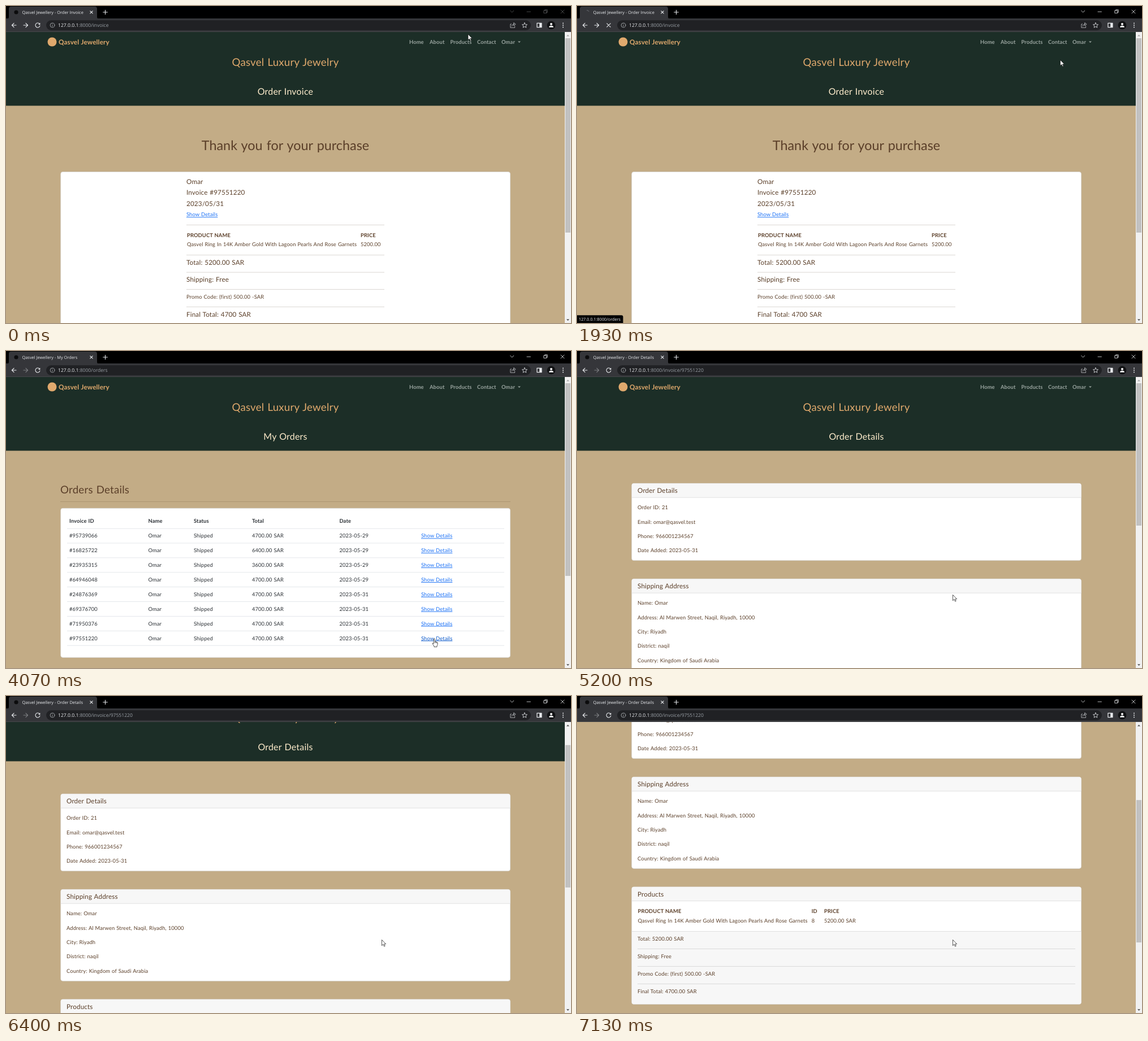
An HTML page that plays this animation: 999 px wide and 561 px high, repeating every 7.54 s.

```html
<!DOCTYPE html>
<html lang="en">
<head>
<meta charset="utf-8">
<title>Order pages</title>
<style>
html, body { margin: 0; width: 100%; height: 100%; overflow: hidden; background: #c3ac86; }
svg { display: block; width: 999px; height: 561px; text-rendering: geometricPrecision; }
.page text { font-family: Lato, "Open Sans", sans-serif; letter-spacing: .012em; word-spacing: .05em; }
.page text.title { letter-spacing: 0; }
.ui text { font-family: "Open Sans", "Noto Sans", sans-serif; }
.line { fill: none; stroke: #e8eaed; stroke-width: 1.1; stroke-linecap: round; stroke-linejoin: round; }
.link { fill: #1a70f5; text-decoration: underline; text-decoration-thickness: .7px; }
.link.on { fill: #0a58ca; }
.nav { fill: #9aa5a0; }
.nav.on { fill: #c4cbc8; }
</style>
</head>
<body>
<svg id="stage" viewBox="0 0 999 561" xmlns="http://www.w3.org/2000/svg"></svg>
<script>
const BRAND = 'Qasvel', USER = 'Omar';
const ITEM = BRAND + ' Ring In 14K Amber Gold With Lagoon Pearls And Rose Garnets';
const BROWN = '#5b3f29', INK = '#2b3035', BODY = 9.37, HEAD = 11.7;
const LOOP = 7540, TICK = 1000 / 15;

// c is the vertical middle of the capitals
const text = (x, c, size, str, fill = BROWN, attrs = '') =>
  `<text x="${x}" y="${(c + size * .36).toFixed(2)}" font-size="${size}" fill="${fill}" ${attrs}>${str}</text>`;
const rect = (x, y, w, h, fill, attrs = '') =>
  `<rect x="${x}" y="${y}" width="${w}" height="${h}" fill="${fill}" ${attrs}/>`;
const rule = (x1, x2, y, colour) => rect(x1, y - .4, x2 - x1, .8, colour);
const path = (d, attrs = 'class="line"') => `<path d="${d}" ${attrs}/>`;
const BOLD = 'font-weight="700"', MID = 'text-anchor="middle"';
const card = (y, h) => rect(96.7, y + .3, 794.9, h - .6, '#fff', 'rx="3.8" stroke="#d2d2d2" stroke-width=".65"');
const link = (x, c, id) =>
  `<text x="${x}" y="${c + 3.37}" font-size="${BODY}" class="link" id="${id}">Show Details</text>`;

const NAV = [['Home', 713, 739], ['About', 749, 776], ['Products', 785.5, 823],
  ['Contact', 833, 866], [USER, 876, 911]];

function header(title) {
  const links = NAV.map(([name, x], i) =>
    `<text x="${x}" y="67.4" font-size="${BODY}" font-weight="700" class="nav n${i}">${name}</text>`).join('');
  return rect(0, 46, 988, 130.5, '#1c2e27') +
    '<circle cx="81.5" cy="63.5" r="8" fill="#e0a96d"/>' +
    text(93, 64, HEAD, BRAND + ' Jewellery', '#e0a96d', BOLD) + links +
    path('M905 62.5h5l-2.5 2.6z', 'fill="#9aa5a0"') +
    text(494, 99, 18.7, BRAND + ' Luxury Jewelry', '#e0a96d', MID) +
    text(494, 151, 16, title, '#fdebcb', MID);
}

function invoicePage() {
  const hr = y => rule(319, 669, y, '#d3cec9');
  return header('Order Invoice') +
    text(494, 247, 23.4, 'Thank you for your purchase', BROWN, MID + ' class="title"') + card(293.2, 300) +
    text(319, 311, HEAD, USER) + text(319, 330, HEAD, 'Invoice #97551220') +
    text(319, 349.5, HEAD, '2023/05/31') + link(319, 369, 'details') +
    [387.5, 440.8, 471.2, 501.6, 532.5].map(hr).join('') +
    text(320, 406, BODY, 'PRODUCT NAME', BROWN, BOLD) + text(627, 406, BODY, 'PRICE', BROWN, BOLD) +
    text(320, 422, BODY, ITEM) + text(627, 422, BODY, '5200.00') +
    text(319, 454, HEAD, 'Total: 5200.00 SAR') + text(319, 484, HEAD, 'Shipping: Free') +
    text(319, 514.3, BODY, 'Promo Code: (first) 500.00 -SAR') +
    text(319, 545.3, HEAD, 'Final Total: 4700 SAR');
}

const ORDERS = [[95739066, 4700, 29], [16825722, 6400, 29], [23935315, 3600, 29], [64946048, 4700, 29],
  [24876369, 4700, 31], [69376700, 4700, 31], [71950376, 4700, 31], [97551220, 4700, 31]];
const rowY = i => 327 + i * 25.88;

function ordersPage() {
  const cols = [112, 251.5, 332, 435, 589.5];
  const row = (cells, c, attrs) => cells.map((s, i) => text(cols[i], c, BODY, s, INK, attrs)).join('');
  return header('My Orders') + text(96, 245, 18.7, 'Orders Details') + rule(96, 892, 266.7, '#a58f6c') +
    card(278, 264.7) + row(['Invoice ID', 'Name', 'Status', 'Total', 'Date'], 301, BOLD) +
    rule(108, 881, 314.2, '#dee2e6') +
    ORDERS.map(([id, sum, day], i) =>
      row(['#' + id, USER, 'Shipped', sum + '.00 SAR', '2023-05-' + day], rowY(i), '') +
      link(734, rowY(i), 'row' + i) + rule(108, 881, 340 + i * 25.88, '#dee2e6')).join('');
}

function panel(y, h, title, rows) {
  return card(y, h) + path(`M97 ${y + 25}v-21q0-3.4 3.4-3.4h787.5q3.4 0 3.4 3.4v21z`, 'fill="#f7f7f7"') +
    rule(96.5, 892, y + 25.2, '#d9d9d9') + text(107, y + 12.8, HEAD, title) +
    rows.map((s, i) => text(107, y + 43 + i * 25.35, BODY, s)).join('');
}

function detailsPage() {
  const hr = y => rule(107, 881, y, '#d3d3d3');
  return header('Order Details') +
    panel(234, 137, 'Order Details', ['Order ID: 21', `Email: ${USER.toLowerCase()}@${BRAND.toLowerCase()}.test`,
      'Phone: 966001234567', 'Date Added: 2023-05-31']) +
    panel(403, 162.7, 'Shipping Address', ['Name: ' + USER, 'Address: Al Marwen Street, Naqil, Riyadh, 10000',
      'City: Riyadh', 'District: naqil', 'Country: Kingdom of Saudi Arabia']) +
    panel(597.5, 208.3, 'Products', []) +
    path('M97 676.5h794.3v125.3q0 3.4-3.4 3.4h-787.5q-3.4 0-3.4-3.4z', 'fill="#f7f7f7"') +
    rule(96.5, 892, 676.4, '#d9d9d9') +
    [['PRODUCT NAME', 107.5], ['ID', 414.7], ['PRICE', 437]].map(([s, x]) => text(x, 641, BODY, s, BROWN, BOLD)).join('') +
    text(107.5, 657.8, BODY, ITEM) + text(414.7, 657.8, BODY, '8') + text(437, 657.8, BODY, '5200.00 SAR') +
    ['Total: 5200.00 SAR', 'Shipping: Free', 'Promo Code: (first) 500.00 -SAR', 'Final Total: 4700.00 SAR']
      .map((s, i) => text(107, 689.5 + i * 31, BODY, s)).join('') +
    [707.5, 738.5, 769.5].map(hr).join('');
}

const menu = () =>
  rect(806, 77, 104, 51, '#fff', 'rx="4" stroke="#b9b9b9" stroke-width=".7"') +
  rect(806.4, 82, 103.2, 20.5, '#e9ecef', 'id="hot"') +
  text(816.5, 92.3, BODY, 'My Orders', INK) + text(816.5, 112.6, BODY, 'Logout', INK);

const scrollbar = () =>
  rect(988, 46, 11, 515, '#f1f1f1') + rect(989, 57, 9, 344, '#c1c1c1', 'id="thumb"') +
  path('M991 53.6h5l-2.5-2.8z', 'id="up"') + path('M991 554.2h5l-2.5 2.8z', 'fill="#505050"');

function browser() {
  const white = 'fill="#e8eaed"';
  return rect(0, 0, 999, 23, '#000') + rect(0, 22, 999, 24, '#35363a') +
    path('M1 23q4 0 4-4V5q0-4 4-4h148q4 0 4 4v14q0 4 4 4z', 'fill="#35363a"') +
    '<circle id="icon" cx="18" cy="11" r="3.6" fill="#0c0c0d"/>' +
    path('M18 7.6a3.4 3.4 0 0 1 3.2 2.3', 'class="line" id="spin" style="stroke:#777b80;stroke-width:.8"') +
    text(28.5, 11, 7.4, '', '#e8eaed', 'id="tab"') +
    path('M148.8 8.8l4.4 4.4m0-4.4l-4.4 4.4M171.7 11h7.6m-3.8-3.8v7.6') +
    '<g id="controls">' + path('M891.6 8.2l3.1 3 3.1-3M921 10.2h6.4M951.2 8h4.6v4.6h-4.6zM952.7 8V6.7h4.5v4.5h-1.3M981 7l6 6m0-6l-6 6',
      'class="line" style="stroke-width:.8"') + '</g>' +
    path('M18 34h-7.4m3.5-3.7L10.4 34l3.7 3.7') +
    path('M31 34h7.4m-3.5-3.7l3.7 3.7-3.7 3.7', 'class="line" id="forward"') +
    '<g id="reload">' + path('M59.6 32.2a4 4 0 1 0 .3 2.7') + path('M60.4 29.7v3.4h-3.4z', white) + '</g>' +
    path('M52.8 30.8l6.4 6.4m0-6.4l-6.4 6.4', 'class="line" id="stop"') +
    rect(71, 25.3, 857, 17.6, '#202124', 'rx="8.8"') +
    path('M85.9 34a3.9 3.9 0 1 1-7.8 0a3.9 3.9 0 1 1 7.8 0zM82 33.8v2.1M82 32v.1', 'class="line" style="stroke:#b4b8bc;stroke-width:.8"') +
    `<text x="92" y="37.2" font-size="8.6" ${white}>127.0.0.1<tspan id="url" fill="#9aa0a6"></tspan></text>` +
    path('M893.6 32h-1.7v6.3h7.7v-2.4M894.3 35.5q.5-3.4 4-3.5m-.3-2.2l3.2 2.5-3.2 2.5z', 'class="line" style="stroke-width:.8;stroke:#c7cacd"') +
    path('M917 29.6l1.3 3 3.2.3-2.4 2.1.7 3.2-2.8-1.7-2.8 1.7.7-3.2-2.4-2.1 3.2-.3z', 'class="line" style="stroke-width:.8"') +
    path('M938.9 30.3h8v7.4h-8z', 'class="line" style="stroke-width:1.2"') + rect(943.2, 30, 4, 8, '#e8eaed') +
    '<circle cx="964" cy="34" r="7.3" fill="#111214"/><circle cx="964" cy="32" r="2" fill="#fff"/>' +
    path('M960 37.8q0-3 4-3t4 3z', 'fill="#fff"') +
    [30.5, 34, 37.5].map(y => `<circle cx="985" cy="${y}" r="1" ${white}/>`).join('') +
    rule(0, 999, 45.6, '#494a4d') +
    '<g id="status">' + path('', 'id="bubble" fill="#050505"') + text(3, 554.4, 7.25, '', '#e8eaed', 'id="hint"') + '</g>';
}

const pointers =
  path('M0 0v10.2l2.4-2.2 1.7 3.7 1.6-.8-1.7-3.5h3.2z', 'id="arrow" fill="#fff" stroke="#111" stroke-width=".7"') +
  path('M-1.2 1q0-1.3 1.1-1.3T1 1v4l1.7.2 1.9.6 1 .9v3.2l-1.1 2.3v2h-5.1v-1.6l-2.8-4q-.5-1.3.9-1.3l1.3 1.2zM1 5.2v2M2.9 5.6v1.8M4.6 6.2v1.6',
    'id="hand" fill="#fff" stroke="#111" stroke-width=".7"');

const stage = document.getElementById('stage');
stage.innerHTML = rect(0, 46, 988, 515, '#c3ac86') +
  [invoicePage, ordersPage, detailsPage].map((f, i) => `<g class="page" id="page${i}">${f()}</g>`).join('') +
  `<g class="page" id="menu">${menu()}</g>` +
  `<g class="ui">${scrollbar()}${browser()}</g><g id="pointer">${pointers}</g>`;

const $ = id => document.getElementById(id);
const show = (id, on) => $(id).setAttribute('visibility', on ? 'visible' : 'hidden');
const within = (v, a, b) => v >= a && v < b;
const clamp = v => Math.max(0, Math.min(1, v));
const smooth = p => p * p * (3 - 2 * p);

// keys are [time, value...]
function along(keys, t, ease = p => p) {
  const i = keys.findIndex(k => k[0] > t);
  if (i < 0) return keys[keys.length - 1].slice(1);
  if (i === 0) return keys[0].slice(1);
  const a = keys[i - 1], b = keys[i], p = ease((t - a[0]) / (b[0] - a[0]));
  return a.slice(1).map((v, n) => v + (b[n + 1] - v) * p);
}

const MOVES = [[0, 817, 50], [466, 893, 64], [800, 893, 64], [1400, 854.5, 95.5], [2600, 854.5, 95.5],
  [3400, 758, 489], [3660, 758, 489], [4000, 757.5, 509.5], [4530, 757.5, 509.5], [5000, 664.5, 431.5]];
const SCROLL = [[5733, 0], [5800, 6], [5933, 43], [6000, 52], [6267, 52], [6333, 54], [6400, 61],
  [6533, 158], [6600, 210], [6667, 234], [6933, 234], [7000, 240], [7067, 253], [7133, 260]];
const HINTS = [[1150, 2270, '/orders'], [3420, 3860, '/invoice/71950376'], [4150, 5190, '/invoice/97551220']];
const PAGES = [
  { title: 'Order Invoice', url: '/invoice', thumb: 344 },
  { title: 'My Orders', url: '/orders', thumb: 341 },
  { title: 'Order Details', url: '/invoice/97551220', thumb: 252 }];

function draw(t) {
  const n = t < 2130 ? 0 : t < 4660 ? 1 : 2, page = PAGES[n];
  const [x, y] = along(MOVES, t, smooth), [top] = along(SCROLL, t);
  const open = within(t, 660, 1590);

  PAGES.forEach((p, i) => show('page' + i, i === n));
  $('page2').setAttribute('transform', `translate(0 ${-top.toFixed(2)})`);
  $('thumb').setAttribute('y', 57 + top * .489);
  $('thumb').setAttribute('height', page.thumb);
  $('up').setAttribute('fill', top > 0 ? '#505050' : '#a9a9a9');

  const navHit = within(y, 56, 73) ? NAV.findIndex(l => within(x, l[1], l[2])) : -1;
  NAV.forEach((l, i) => document.querySelectorAll('.n' + i).forEach(e => e.classList.toggle('on', i === navHit)));
  let rowHit = -1;
  ORDERS.forEach((o, i) => {
    const hit = n === 1 && within(x, 734, 791) && Math.abs(y - rowY(i)) < 7;
    if (hit) rowHit = i;
    $('row' + i).classList.toggle('on', hit);
  });
  const itemHit = open && within(x, 806, 910) && within(y, 82, 102.5);
  show('menu', open);
  show('hot', itemHit);

  const onLink = navHit >= 0 || rowHit >= 0 || itemHit;
  show('hand', onLink);
  show('arrow', !onLink);
  $('pointer').setAttribute('transform', `translate(${x.toFixed(2)} ${y.toFixed(2)})`);

  const spinning = within(t, 1590, 2390) || within(t, 4260, 4990);
  const loading = within(t, 1590, 2300) || within(t, 4260, 4900);
  show('spin', spinning);
  show('icon', !spinning);
  $('spin').setAttribute('transform', `rotate(${-t * .36 - 30} 18 11)`);
  show('stop', loading);
  show('reload', !loading);
  $('forward').setAttribute('opacity', n ? .4 : 1);
  $('controls').setAttribute('opacity', t < 660 ? .38 : 1);
  $('tab').textContent = `${BRAND} Jewellery - ${page.title}`;
  $('url').textContent = ':8000' + page.url;

  const hint = HINTS.find(h => within(t, h[0], h[1]));
  show('status', !!hint);
  if (hint) {
    const w = hint[2].length > 10 ? 120.5 : 81.5;
    $('hint').textContent = '127.0.0.1:8000' + hint[2];
    $('bubble').setAttribute('d', `M0 547.3h${w - 3}q3 0 3 3V561H0z`);
    $('status').setAttribute('opacity', Math.min(clamp((t - hint[0]) / 115), clamp((hint[1] - t) / 185)));
  }
}

const start = performance.now();
function frame() {
  const ms = (performance.now() - start) % LOOP;
  draw(Math.floor((ms + 4) / TICK) * TICK);
  requestAnimationFrame(frame);
}
frame();
</script>
</body>
</html>
```
